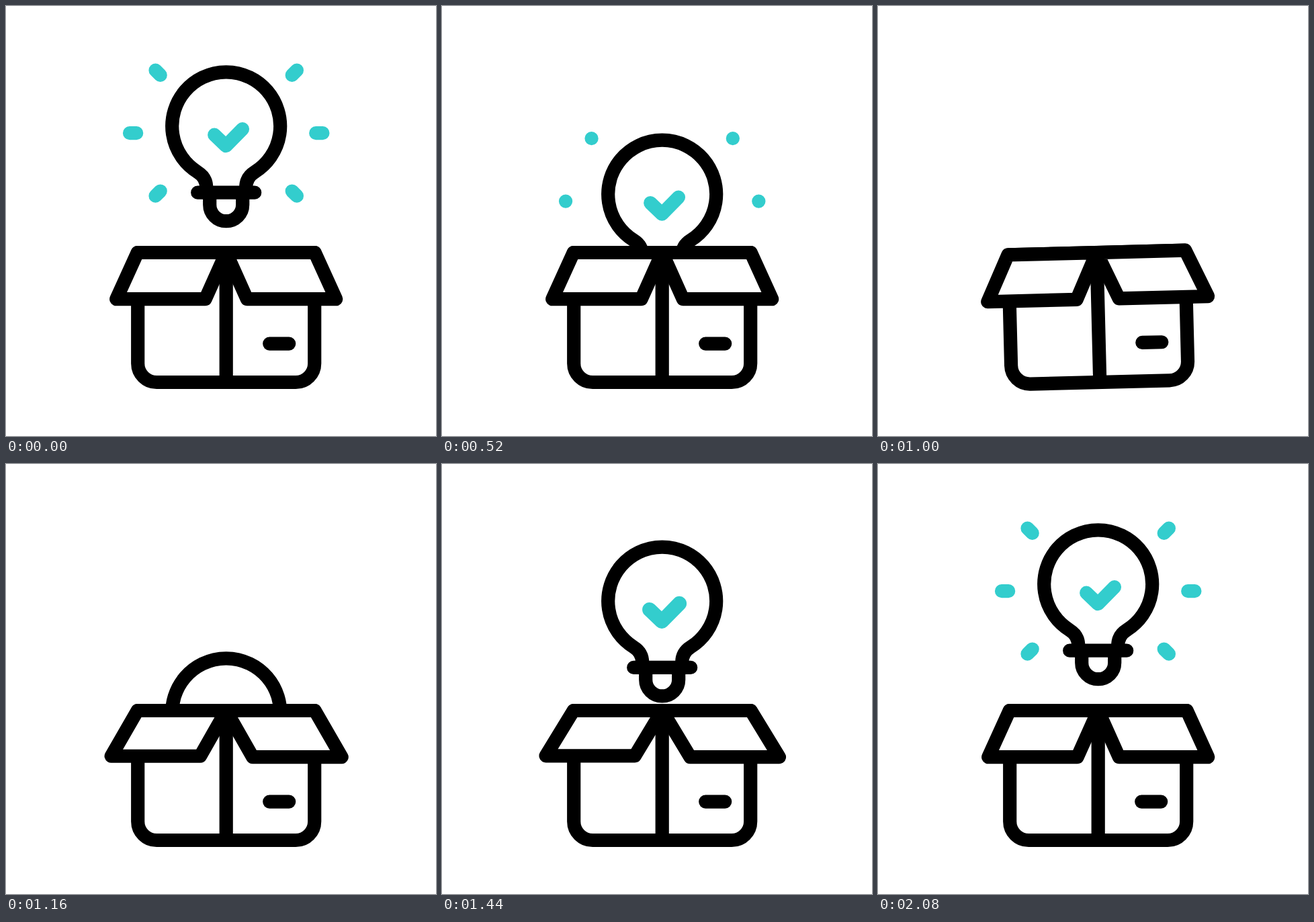
Recreate the animation shown at these times as an HTML page. Size 640 by 640 pixels, loop 2.16 s.

```html
<!DOCTYPE html>
<html lang="en">
<head>
<meta charset="utf-8">
<title>Idea in a box</title>
<style>
  html, body { margin: 0; width: 100%; height: 100%; overflow: hidden; background: #fff; }
  svg { display: block; width: 100%; height: 100%; }
  path { fill: none; stroke: #000; stroke-width: 20.2; stroke-linecap: round; stroke-linejoin: round; }
  .solid { fill: #fff; }
  .teal { stroke: #33cdcd; }
</style>
</head>
<body>
<!-- x = 0 is the axis of symmetry -->
<svg viewBox="-327.7 0 640 640">
  <clipPath id="above"><path d="M-328 0H328V430H-328Z"/></clipPath>
  <g clip-path="url(#above)">
    <g id="bulb">
      <path d="M-29.5 270C-29.5 260-34 252.3-42.5 247A80.5 80.5 0 1 1 42.5 247C34 252.3 29.5 260 29.5 270"/>
      <path d="M-42.5 277.5H42.5M-24.5 277.5V295.5a24.5 24.5 0 0 0 49 0V277.5"/>
      <path id="check" class="teal" d="M-17.5 191.5L-.3 208L24.3 183"/>
      <path id="rays" class="teal"/>
    </g>
  </g>
  <g id="box">
    <path class="solid" d="M-131.5 367V532a28 28 0 0 0 28 28H103.5a28 28 0 0 0 28-28V367Z"/>
    <path d="M0 367V560M64.5 502.6H93.5"/>
    <path id="left" class="solid"/>
    <path id="right" class="solid"/>
  </g>
</svg>
<script>
const LOOP = 2160, STEP = 40, HIDDEN = 300;
const $ = id => document.getElementById(id);
const set = (id, name, value) => $(id).setAttribute(name, value);

// Smooth step from 0 at time a to 1 at time b
function ramp(t, a, b) {
  const u = Math.min(1, Math.max(0, (t - a) / (b - a)));
  return u * u * (3 - 2 * u);
}

// Smooth rise and fall of equal length, starting at a
const bump = (t, a, half) => ramp(t, a, a + half) - ramp(t, a + half, a + 2 * half);

// Falls in with growing speed, comes out slowing down
function bulbDrop(t) {
  const y = t < 900
    ? 234 * (t / 720) ** 2.57
    : 101 * (Math.max(0, 1600 - t) / 320) ** 2;
  return Math.min(HIDDEN, y);
}

// Rays keep their outer ends and shrink towards them
function rayPath(glow) {
  let d = '';
  if (glow < 0.005) return d;
  for (const sx of [-1, 1]) {
    for (const sy of [-1, 0, 1]) {
      const x = sx * (sy ? 105.2 : 143.7), y = 189 + sy * 93.5;
      const length = 10.2 * glow, angle = sy * Math.PI / 4;
      d += `M${x} ${y}l${-sx * length * Math.cos(angle)} ${-length * Math.sin(angle)}`;
    }
  }
  return d;
}

function flapPath(side, spread, lift) {
  const y = 436.2 - lift;
  return `M0 367H${side * 132}L${side * (163.5 + spread)} ${y}H${side * (31 + spread)}Z`;
}

function draw(t) {
  set('bulb', 'transform', `translate(0 ${bulbDrop(t) + 0.2})`);

  const pulse = 1 + 0.13 * bump(t, 1360, 160);
  set('check', 'transform', `translate(3.3 196) scale(${pulse}) translate(-3.3 -196)`);

  set('rays', 'd', rayPath(1 - ramp(t, 240, 540) + ramp(t, 1680, 2080)));

  const tilt = 3 * (ramp(t, 840, 920) - 2 * ramp(t, 920, 1040) + ramp(t, 1040, 1160));
  set('box', 'transform', `rotate(${tilt} 0 458)`);

  const open = bump(t, 960, 360);
  set('left', 'd', flapPath(-1, 13 * open, 2.5 * open));
  set('right', 'd', flapPath(1, 14.5 * open, 0));
}

const start = performance.now();
function tick() {
  const t = (performance.now() - start) % LOOP;
  draw(Math.floor(t / STEP) * STEP);
  requestAnimationFrame(tick);
}
tick();
</script>
</body>
</html>
```
